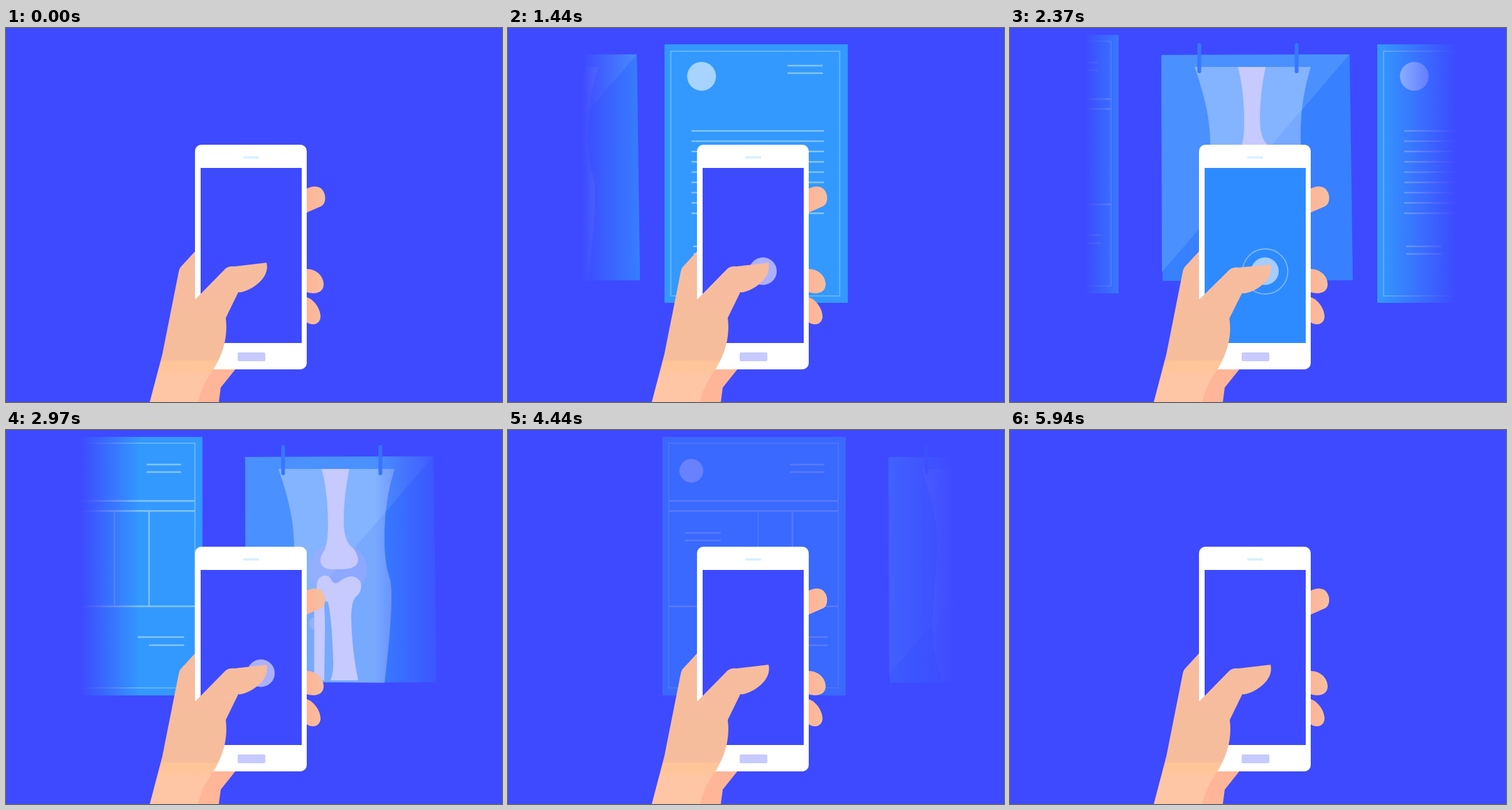
Write an HTML page that moves like this. It is 790x596 px and loops after 6 s.

```html
<!DOCTYPE html>
<html lang="en">
<head>
<meta charset="utf-8">
<title>Saving documents by phone</title>
<style>
  html, body { margin: 0; width: 100%; height: 100%; overflow: hidden; background: #3e4aff; }
  svg { display: block; width: 790px; height: 596px; }
  .paper { fill: #3399ff; }
  .frame { fill: none; stroke: #64b5ff; stroke-width: 2; }
  .rule { fill: none; stroke: #85c6ff; stroke-width: 2.4; }
  .dot { fill: #a6d4ff; }
  .bone { fill: #c6caff; }
  .label { font: 500 14px Inter, "Open Sans", sans-serif; letter-spacing: .7px; fill: #fff; text-anchor: middle; }
</style>
</head>
<body>
<svg viewBox="0 0 790 596">
  <defs>
    <linearGradient id="edgeFade" gradientUnits="userSpaceOnUse" x1="118" x2="712" y1="0" y2="0">
      <stop offset="0" stop-color="#000"/>
      <stop offset=".16" stop-color="#fff"/>
      <stop offset=".79" stop-color="#fff"/>
      <stop offset="1" stop-color="#000"/>
    </linearGradient>
    <mask id="window" maskUnits="userSpaceOnUse" x="0" y="0" width="790" height="596" style="mask-type: luminance">
      <rect x="118" width="594" height="596" fill="url(#edgeFade)"/>
    </mask>
    <linearGradient id="skin" gradientUnits="userSpaceOnUse" x1="0" x2="0" y1="356" y2="596">
      <stop offset="0" stop-color="#f7bc9f"/>
      <stop offset=".72" stop-color="#f5bd9b"/>
      <stop offset=".73" stop-color="#ffc598"/>
      <stop offset=".8" stop-color="#ffc59c"/>
      <stop offset=".83" stop-color="#ffc6a6"/>
    </linearGradient>
    <linearGradient id="finger" gradientUnits="userSpaceOnUse" x1="479" x2="508" y1="0" y2="0">
      <stop offset=".2" stop-color="#ffb598"/>
      <stop offset=".7" stop-color="#f6bd9e"/>
    </linearGradient>
  </defs>

  <rect width="790" height="596" fill="#3e4aff"/>

  <g mask="url(#window)">
    <g id="papers">
      <g id="letter">
        <rect class="paper" x="242" y="26" width="292" height="412"/>
        <rect class="frame" x="252" y="37" width="269" height="390"/>
        <circle class="dot" cx="301" cy="77" r="23"/>
        <path class="rule" id="letterRules"/>
      </g>
      <g id="scan">
        <g transform="translate(241)">
          <path fill="#3780ff" d="M0 43L300 42L305 402L2 403Z"/>
          <path fill="#4a90ff" d="M0 43L300 42L1 389Z"/>
          <path fill="#fff" fill-opacity=".32" d="M53 62H238Q223 110 222 160T230 235T222 403L85 401Q70 350 70 310C70 265 78 230 78 185C78 140 66 100 53 62Z"/>
          <ellipse cx="148" cy="222" rx="46" ry="43" fill="#a9a8ff" fill-opacity=".42"/>
          <ellipse cx="110" cy="308" rx="8" ry="10" fill="#a9b4ff" fill-opacity=".6"/>
          <path class="bone" d="M122 62H166Q157 105 157 145Q157 172 167 184Q180 195 180 207Q180 221 155 222H138Q120 221 120 208Q120 200 126 192Q132 180 132 150Q132 100 122 62Z"/>
          <path class="bone" d="M114 251Q114 232 128 232Q135 232 138 240Q143 248 151 241C160 234 168 232 174 234Q185 238 185 249Q184 261 176 266Q169 275 169 300Q170 350 180 399H136Q142 385 140 360Q138 300 132 274Q116 270 114 251Z"/>
          <circle class="bone" cx="112.500" cy="275" r="12.500"/>
          <path class="bone" d="M110 280L125 268Q128 300 127 330L126 399H110Z"/>
          <path fill="none" stroke="#3877ff" stroke-width="6" stroke-linecap="round" d="M60.500 27V69M215.500 27V69"/>
        </g>
      </g>
      <g id="form">
        <rect class="paper" x="246" y="11" width="292" height="412"/>
        <path class="frame" d="M256 21H526V411H256ZM398 129V281"/>
        <circle class="dot" cx="292" cy="65" r="19"/>
        <path class="rule" id="formRules"/>
      </g>
    </g>
  </g>

  <g fill="url(#finger)">
    <path d="M470 258L479 256Q490 250 499 254C511 260 511 280 502 284L470 298Z"/>
    <path d="M470 382L479 384C494 384 506 395 506 409C505 422 493 425 479 421L470 418Z"/>
    <path d="M470 426L479 429C490 432 501 447 501 460C500 473 488 475 479 469L470 464Z"/>
  </g>
  <path fill="#ffb598" d="M305 596Q311 570 331 540H368L366 543L342 573L339 596Z"/>
  <rect x="301" y="186" width="178" height="358" rx="10" fill="#fff"/>
  <rect x="378" y="204.500" width="25" height="3.500" fill="#d8f0ff"/>
  <rect x="369" y="517" width="44" height="14" rx="2" fill="#c6caff"/>
  <rect x="310" y="223" width="161" height="279" fill="#3e4aff"/>
  <rect id="flash" x="310" y="223" width="161" height="279" fill="#2b99ff"/>

  <g id="saved">
    <g id="badge">
      <circle r="33.500" fill="#ff6d00"/>
      <path id="tick" fill="none" stroke="#fff" stroke-width="2.800" d="M-17 3L-4 14L18 -12" pathLength="1" stroke-dasharray="1 2"/>
    </g>
    <text class="label" id="label" x="391.300" y="353">SAVED</text>
  </g>

  <circle id="spot" cx="406" cy="387.500" r="22" fill="#fff"/>
  <circle id="ring" cx="406.500" cy="388" fill="none" stroke="#8cc4ff" stroke-width="1.800"/>
  <path id="hand" fill="url(#skin)"/>
</svg>

<script>
const LOOP = 6000, STEP = 30;
const SLIDES = [[-20, 350], [1329, 1965], [2679, 3315]];
const TAPS = [340, 2055, 3415];
// Horizontal offset of each sheet at the four stops of the carousel.
const STOPS = {
  letter: [-365, 0, 343, 708],
  scan: [-708, -343, 0, 365],
  form: [-1073, -708, -365, 0]
};

const $ = id => document.getElementById(id);
const clamp = v => Math.min(1, Math.max(0, v));
const ramp = (t, a, b) => clamp((t - a) / (b - a));
const easeInOut = u => u < .5 ? 4 * u ** 3 : 1 - 4 * (1 - u) ** 3;
const easeOut = u => 1 - (1 - u) ** 3;
const fade = (id, value) => $(id).setAttribute('opacity', value);

function keyed(t, keys) {
  let value = keys[0][1];
  for (let i = 1; i < keys.length; i++) {
    const [t0, v0] = keys[i - 1], [t1, v1] = keys[i];
    if (t >= t0) value = v0 + (v1 - v0) * ramp(t, t0, t1);
  }
  return value;
}

const rules = (x0, x1, ...ys) => ys.map(y => `M${x0} ${y}H${x1}`).join('');
const bodyRows = Array.from({ length: 9 }, (_, i) => 164 + i * 16.4);
$('letterRules').setAttribute('d',
  rules(438, 494, 60, 72) + rules(285, 496, ...bodyRows) + rules(288, 344, 348, 360));
$('formRules').setAttribute('d',
  rules(256, 526, 113, 129, 281) + rules(449, 504, 55, 67) + rules(282, 339, 164, 176) +
  rules(435, 509, 330) + rules(453, 509, 343) + 'M453 129V281');

function handPath(d) {
  const knuckle = d * .6;
  return `M301 356L279 380Q276 383 275 389L249 520L229 596H306Q311 570 331 543
    C345 520 354 493 ${350 - d * .2} ${462 + d * .3}L${370 - d * .2} ${421 + knuckle}
    C382 ${423 + knuckle} 422 ${402 + d} 415 ${374 + d}
    L364 ${380 + knuckle}Q355 ${379 + knuckle} 349 ${384 + knuckle}L302 432L301 432Z`;
}

function drawPapers(t) {
  const progress = SLIDES.map(([a, b]) => easeInOut(ramp(t, a, b)));
  for (const [id, stops] of Object.entries(STOPS)) {
    const x = progress.reduce((sum, p, i) => sum + p * (stops[i + 1] - stops[i]), stops[0]);
    $(id).setAttribute('transform', `translate(${x})`);
  }
  fade('papers', ramp(t, 0, 180) * (1 - ramp(t, 4050, 4700)));
}

function drawTap(t) {
  const start = TAPS.filter(s => s <= t).pop() ?? t;
  const p = t - start;
  fade('flash', keyed(p, [[120, 0], [220, 1], [305, .85], [350, .75], [600, 0]]));
  fade('ring', keyed(p, [[80, 0], [140, .9], [360, .8], [570, 0]]));
  $('ring').setAttribute('r', 22 + 14 * easeOut(ramp(p, 80, 260)));
  fade('spot', .57 * ramp(t, 30, 270) * (1 - ramp(t, 3960, 4200)));
  $('hand').setAttribute('d', handPath(keyed(p, [[0, 0], [150, 7], [265, 7], [350, 0]])));
}

function drawSaved(t) {
  const size = easeOut(ramp(t, 4590, 4860));
  $('badge').setAttribute('transform', `translate(390.5 297.5) scale(${size})`);
  $('tick').setAttribute('stroke-dashoffset', 1 - easeInOut(ramp(t, 4800, 5070)));
  fade('label', ramp(t, 4860, 5130));
  fade('saved', 1 - ramp(t, 5400, 5930));
}

const begin = performance.now();
function draw() {
  const t = Math.floor((performance.now() - begin) / STEP) * STEP % LOOP;
  drawPapers(t);
  drawTap(t);
  drawSaved(t);
  requestAnimationFrame(draw);
}
draw();
</script>
</body>
</html>
```
